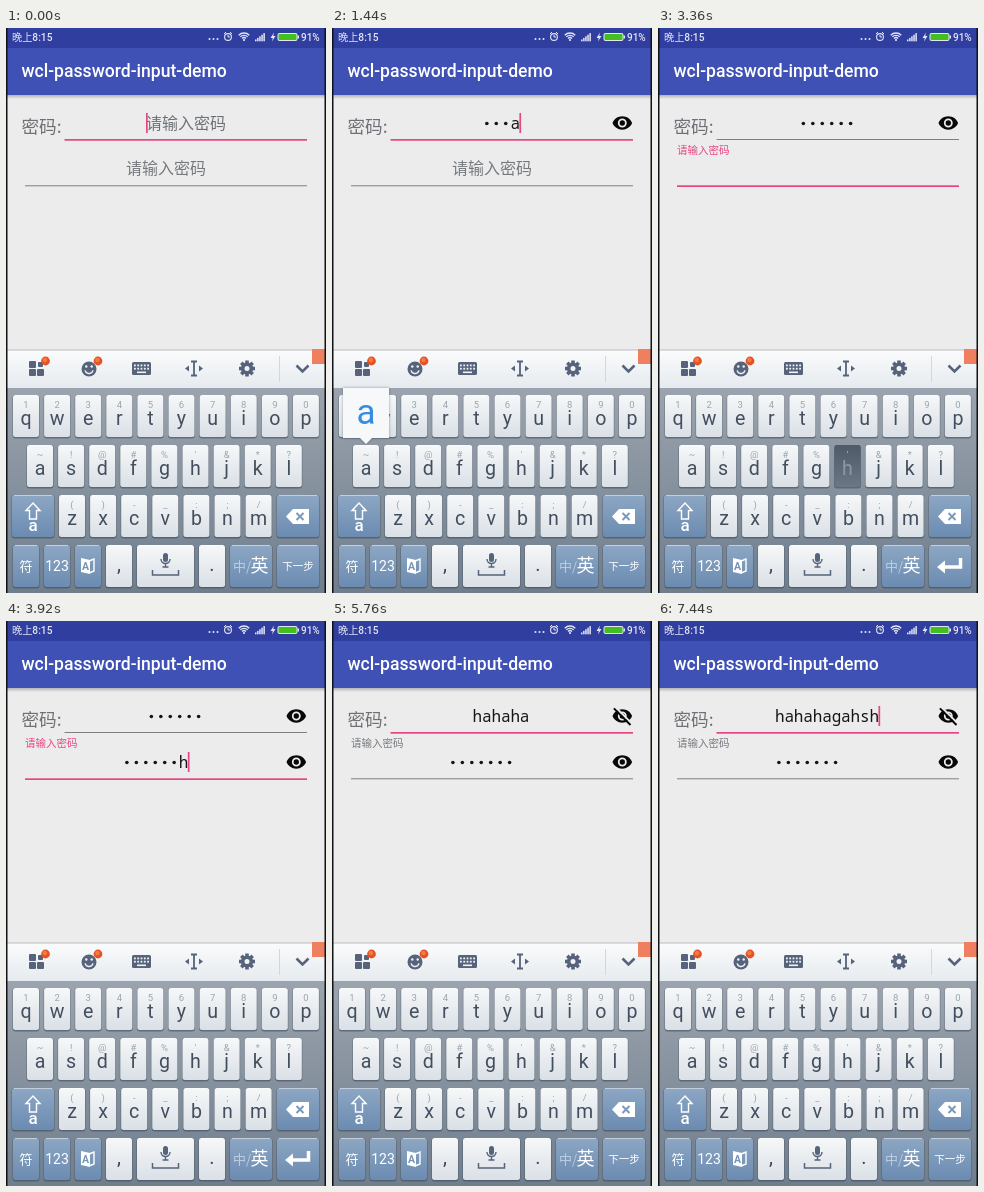
Animation of 320x565 px, one loop 7.84 s. Source, as an HTML page with a canvas:

```html
<!DOCTYPE html>
<html lang="zh">
<head>
<meta charset="utf-8">
<title>wcl-password-input-demo</title>
<style>
html, body { margin: 0; width: 100%; height: 100%; overflow: hidden; background: #ececec; }
canvas { display: block; width: 320px; height: 565px; }
</style>
</head>
<body>
<canvas id="stage"></canvas>
<script>
const LOOP = 7840, STEP = 80, CELL = 9.45;
const SANS = 'Roboto, "Noto Sans CJK SC", "Noto Sans CJK", sans-serif';
const CJK = '"Noto Sans CJK SC", "Noto Sans CJK", sans-serif';
const MONO = '"Noto Sans Mono", monospace';
const PINK = [233, 69, 132], GRAY = [118, 122, 127], ICON = '#56637a', PALE = '#e2e5f4', PAGE = '#ececec';

const canvas = document.getElementById('stage');
const ctx = canvas.getContext('2d');
const ratio = window.devicePixelRatio || 1;
canvas.width = 320 * ratio;
canvas.height = 565 * ratio;

// Typing bursts: one character per step.
const typed = (t, start, text) => text.slice(0, Math.max(0, Math.floor((t - start) / STEP) + 1));
const within = (t, ranges) => ranges.some(([from, to]) => t >= from && t < to);
const CURSOR_OFF = [[80, 480], [880, 1200], [2000, 2240], [3200, 3440], [4320, 4640],
  [5040, 5200], [5600, 6000], [6400, 6640], [7040, 7440]];

function stateAt(t) {
  const state = {
    focus: t >= 2800 && t < 5200 ? 2 : 1,
    cursor: !within(t, CURSOR_OFF),
    float: Math.min(1, Math.max(0, (t - 2800) / 160)),
    first: typed(t, 1200, 'hahaha') + typed(t, 6080, 'gahsh'),
    second: typed(t, 3440, 'hahahah'),
    firstShown: within(t, [[2240, 2480], [4800, LOOP]]),
    secondShown: within(t, [[4560, 4640]]),
    firstPeek: t < 2240,
    secondPeek: t < 4560
  };
  const keyAt = (start, text) => text[Math.floor((t - start) / STEP)] || '';
  state.popup = keyAt(1200, 'hahaha');
  state.pressed = keyAt(3360, 'hahahah') || keyAt(6000, 'gahsh');
  if (state.pressed === 'a' && t >= 6000) {
    state.popup = 'a';
    state.pressed = '';
  }
  return state;
}

const rgb = c => `rgb(${c.map(Math.round)})`;
const mix = (a, b, p) => a + (b - a) * p;

function shade(y, h, top, bottom) {
  const g = ctx.createLinearGradient(0, y, 0, y + h);
  g.addColorStop(0, top);
  g.addColorStop(1, bottom);
  return g;
}
function rect(x, y, w, h, fill) {
  ctx.fillStyle = fill;
  ctx.fillRect(x, y, w, h);
}
function box(x, y, w, h, r, fill) {
  ctx.beginPath();
  ctx.roundRect(x, y, w, h, r);
  ctx.fillStyle = fill;
  ctx.fill();
}
function disc(x, y, r, fill) {
  ctx.beginPath();
  ctx.arc(x, y, r, 0, 7);
  ctx.fillStyle = fill;
  ctx.fill();
}
function ring(x, y, r, width, color, from = 0, to = 2 * Math.PI) {
  ctx.beginPath();
  ctx.arc(x, y, r, from, to);
  ctx.lineWidth = width;
  ctx.strokeStyle = color;
  ctx.stroke();
}
function text(str, x, y, size, color, align = 'left', family = SANS, weight = 400) {
  ctx.font = `${weight} ${size}px ${family}`;
  ctx.textAlign = align;
  ctx.fillStyle = color;
  ctx.fillText(str, x, y);
}
// SVG path drawn around a local origin; filled unless a line width is given.
function path(d, x, y, color, width = 0, scale = 1) {
  ctx.save();
  ctx.translate(x, y);
  ctx.scale(scale, scale);
  const p = new Path2D(d);
  ctx.fillStyle = ctx.strokeStyle = color;
  ctx.lineWidth = width;
  if (width) ctx.stroke(p); else ctx.fill(p, 'evenodd');
  ctx.restore();
}

function drawBars() {
  rect(0, 0, 320, 20, '#303f9f');
  text('晚上8:15', 6, 12.5, 10.2, PALE, 'left', SANS, 500);
  for (let i = 0; i < 3; i++) disc(203.5 + i * 4, 11, 1, PALE);
  ring(222, 9, 3.4, 1.1, PALE);
  path('M0-2V0H2M-4-3L-2-5M4-3L2-5', 222, 9, PALE, 1);
  for (const r of [2.8, 5.2, 7.5]) ring(238, 12.5, r, 1.3, PALE, -2.35, -0.79);
  disc(238, 12, 1.1, PALE);
  for (let i = 0; i < 5; i++) rect(249 + i * 2.1, 11.5 - i * 1.6, 1.5, 1.8 + i * 1.6, PALE);
  path('M1-4.5L-2.5 1H-.2L-1 4.5L2.5-1H.2Z', 267, 9, PALE);
  box(271.5, 5, 20, 8, 2, PALE);
  box(272.5, 6, 18, 6, 1, '#43c01e');
  rect(291.5, 7.5, 1.5, 3, PALE);
  text('91%', 295, 12.5, 10, PALE, 'left', SANS, 500);

  rect(0, 20, 320, 47, '#3f51b5');
  rect(0, 67, 320, 4, shade(67, 4, '#b4b4b8', PAGE));
  text('wcl-password-input-demo', 15.5, 49, 17.6, '#fff', 'left', SANS, 500);
}

function drawEye(y, shown) {
  path('M0-7.5C-5-7.5-9.3-4.4-11 0C-9.3 4.4-5 7.5 0 7.5S9.3 4.4 11 0C9.3-4.4 5-7.5 0-7.5ZM5 0A5 5 0 1 1-5 0A5 5 0 1 1 5 0ZM3 0A3 3 0 1 1-3 0A3 3 0 1 1 3 0Z',
    290.3, y, '#080808', 0, 0.889);
  if (shown) {
    path('M-7-9L9.6 7.6', 290.3, y, PAGE, 2);
    path('M-8.4-7.6L8.2 9', 290.3, y, '#080808', 2);
  }
}

function drawField({ value, shown, peek, focused, cursor, left, y, lineY, emptyCursor }) {
  rect(left, lineY, 301 - left, focused ? 1.7 : 1, focused ? rgb(PINK) : '#7d8084');
  const start = (left + 279.5) / 2 - value.length * CELL / 2;
  [...value].forEach((char, i) => {
    const x = start + (i + 0.5) * CELL;
    if (shown || (peek && i === value.length - 1)) text(char, x, y + 6, 16, '#151515', 'center', MONO);
    else disc(x, y + 0.5, 1.8, '#151515');
  });
  if (value) drawEye(y, shown);
  if (focused && cursor) rect(value ? start + value.length * CELL - 0.5 : emptyCursor, y - 10, 1.7, 20, rgb(PINK));
}

function drawForm(s) {
  text('密码:', 15.5, 105, 17.6, '#6d7074', 'left', CJK);
  if (!s.first) text('请输入密码', 180, 100.5, 16, '#6d7277', 'center', CJK);
  drawField({ value: s.first, shown: s.firstShown, peek: s.firstPeek, focused: s.focus === 1,
    cursor: s.cursor, left: 58.5, y: 95, lineY: 111, emptyCursor: 140 });
  drawField({ value: s.second, shown: s.secondShown, peek: s.secondPeek, focused: s.focus === 2,
    cursor: s.cursor, left: 19, y: 141, lineY: 157.3, emptyCursor: 159.5 });
  const p = s.float * s.float * (3 - 2 * s.float);
  const color = s.focus === 2 ? GRAY.map((c, i) => mix(c, PINK[i], p)) : GRAY;
  text('请输入密码', mix(120, 19, p), mix(146, 126, p), mix(16, 10.5, p), rgb(color), 'left', CJK);
}

function drawToolbar() {
  rect(0, 322, 320, 38, shade(322, 38, '#fafbfc', '#e6ebef'));
  rect(0, 321.5, 320, 1, '#b9bec4');
  rect(273, 328, 1, 26, '#d2d7dc');

  for (const [x, y] of [[23, 333], [23, 341], [31, 341]]) box(x, y, 7, 7, 1, ICON);
  box(32, 334, 5, 5, 1, ICON);
  disc(83, 341, 7.5, ICON);
  disc(80.3, 338.5, 1.2, '#f1f4f6');
  disc(85.7, 338.5, 1.2, '#f1f4f6');
  ring(83, 341.5, 4, 1.5, '#f1f4f6', 0.2, 2.94);
  for (const x of [39.5, 92]) {
    disc(x, 333, 4.4, '#e65323');
    disc(x - 0.6, 332, 2.2, '#f47a45');
  }

  box(126, 334, 19, 13, 1.5, ICON);
  for (let row = 0; row < 2; row++)
    for (let i = 0; i < 5; i++) rect(128 + i * 3.3, 336.5 + row * 3.3, 1.8, 1.8, '#f1f4f6');
  rect(131, 343.5, 9, 1.6, '#f1f4f6');

  path('M-3-7H3M0-7V7M-3 7H3', 188, 340.5, ICON, 1.8);
  path('M-5-3V3L-9 0ZM5-3V3L9 0Z', 188, 340.5, ICON);

  for (let i = 0; i < 8; i++) {
    ctx.save();
    ctx.translate(241, 340.5);
    ctx.rotate(i * Math.PI / 4);
    rect(-1.8, -8, 3.6, 4, ICON);
    ctx.restore();
  }
  ring(241, 340.5, 4.3, 3.6, ICON);
  path('M-6-3L0 3L6-3', 296.5, 340.5, ICON, 2.6);
  rect(306, 321, 14, 15, '#ee8060');
}

function drawKey(x, y, w, kind) {
  const fills = {
    light: ['#f6f8f9', '#dae0e6'],
    blue: ['#8da7c4', '#6b8bb1'],
    dark: ['#4d5a68', '#6b7784']
  }[kind];
  box(x - 0.5, y, w + 1, 43.5, 3, 'rgba(52,64,78,.5)');
  box(x, y, w, 42, 2.5, shade(y, 42, ...fills));
  if (kind !== 'dark') rect(x + 2, y, w - 4, 1, 'rgba(255,255,255,.45)');
}

const ROWS = [
  { letters: 'qwertyuiop', hints: '1234567890', x: 7, y: 367 },
  { letters: 'asdfghjkl', hints: "~!@#%'&*?", x: 21, y: 417 },
  { letters: 'zxcvbnm', hints: '()-_:;/', x: 53, y: 467 }
];

function drawLetters(s) {
  for (const row of ROWS) [...row.letters].forEach((char, i) => {
    const x = row.x + i * 31.1, down = s.pressed === char;
    drawKey(x, row.y, 26, down ? 'dark' : 'light');
    text(row.hints[i], x + 13, row.y + 13, 9.5, down ? '#c0c8d0' : '#9da4ad', 'center');
    text(char, x + 13, row.y + 29.5, 19.6, down ? '#8d98a5' : '#434e5e', 'center');
  });
}

function drawFunctionKeys(focus) {
  drawKey(6, 467, 42, 'blue');
  path('M0-10L7-2.5H3.5V6H-3.5V-2.5H-7Z', 27, 485, '#fff', 1.4);
  text('a', 27, 502.5, 17, '#fff', 'center', SANS, 500);
  drawKey(271, 467, 42, 'blue');
  path('M-12 0L-5-7.5H11V7.5H-5Z', 292, 488.5, '#fff');
  path('M-1.5-3.5L5.5 3.5M5.5-3.5L-1.5 3.5', 292, 488.5, '#7c99bb', 2);

  drawKey(7, 517, 26, 'blue');
  text('符', 20, 542.5, 13, '#fff', 'center', CJK);
  drawKey(38, 517, 26, 'blue');
  text('123', 51, 542.5, 14, '#fff', 'center');
  drawKey(69, 517, 26, 'blue');
  path('M-6-8L3-6V8L-6 6Z', 81, 538, '#fff');
  path('M2-5L7-7V5L2 7', 81, 538, '#fff', 1.4);
  text('A', 79.5, 542, 10.5, '#7593b7', 'center', SANS, 700);

  drawKey(100, 517, 26, 'light');
  text(',', 113, 543, 20, '#3c4757', 'center');
  drawKey(131, 517, 57, 'light');
  box(157, 525, 5, 9, 2.5, ICON);
  path('M-4.5-1C-4.5 5 4.5 5 4.5-1M0 4V7M-3 7H3', 159.5, 532, ICON, 1.4);
  path('M-13-4V1H13V-4', 159.5, 546, ICON, 1.5);
  drawKey(193, 517, 26, 'light');
  text('.', 206, 543, 20, '#3c4757', 'center');

  drawKey(224, 517, 42, 'blue');
  text('中/', 227, 542.5, 13, '#bdcee2', 'left', CJK);
  text('英', 244.5, 544, 18, '#fff', 'left', CJK);
  drawKey(271, 517, 42, 'blue');
  if (focus === 1) text('下一步', 292, 542, 10.5, '#fff', 'center', CJK);
  else {
    path('M10.5-7V2H-6', 292, 537, '#fff', 3.5);
    path('M-13 2L-5-4.5V8.5Z', 292, 537, '#fff');
  }
}

function drawPopup(char) {
  const row = ROWS.find(r => r.letters.includes(char));
  const cx = row.x + row.letters.indexOf(char) * 31.1 + 13, top = row.y - 57;
  ctx.save();
  ctx.shadowColor = 'rgba(40,50,65,.5)';
  ctx.shadowBlur = 3;
  path('M-23 0H23V50H6L0 56L-6 50H-23Z', cx, top, '#f6f8fa');
  ctx.restore();
  text(char, cx, top + 36, 35, '#368ce0', 'center');
}

function draw(t) {
  const s = stateAt(t);
  ctx.setTransform(ratio, 0, 0, ratio, 0, 0);
  rect(0, 0, 320, 565, PAGE);
  drawBars();
  drawForm(s);
  drawToolbar();
  rect(0, 360, 320, 205, shade(360, 205, '#9ba4ae', '#6f7d8d'));
  drawLetters(s);
  drawFunctionKeys(s.focus);
  if (s.popup) drawPopup(s.popup);
  for (const x of [0, 318.5]) rect(x, 0, 1.5, 565, '#101216');
}

const startTime = performance.now();
function frame() {
  draw((performance.now() - startTime) % LOOP);
  requestAnimationFrame(frame);
}
frame();
</script>
</body>
</html>
```
